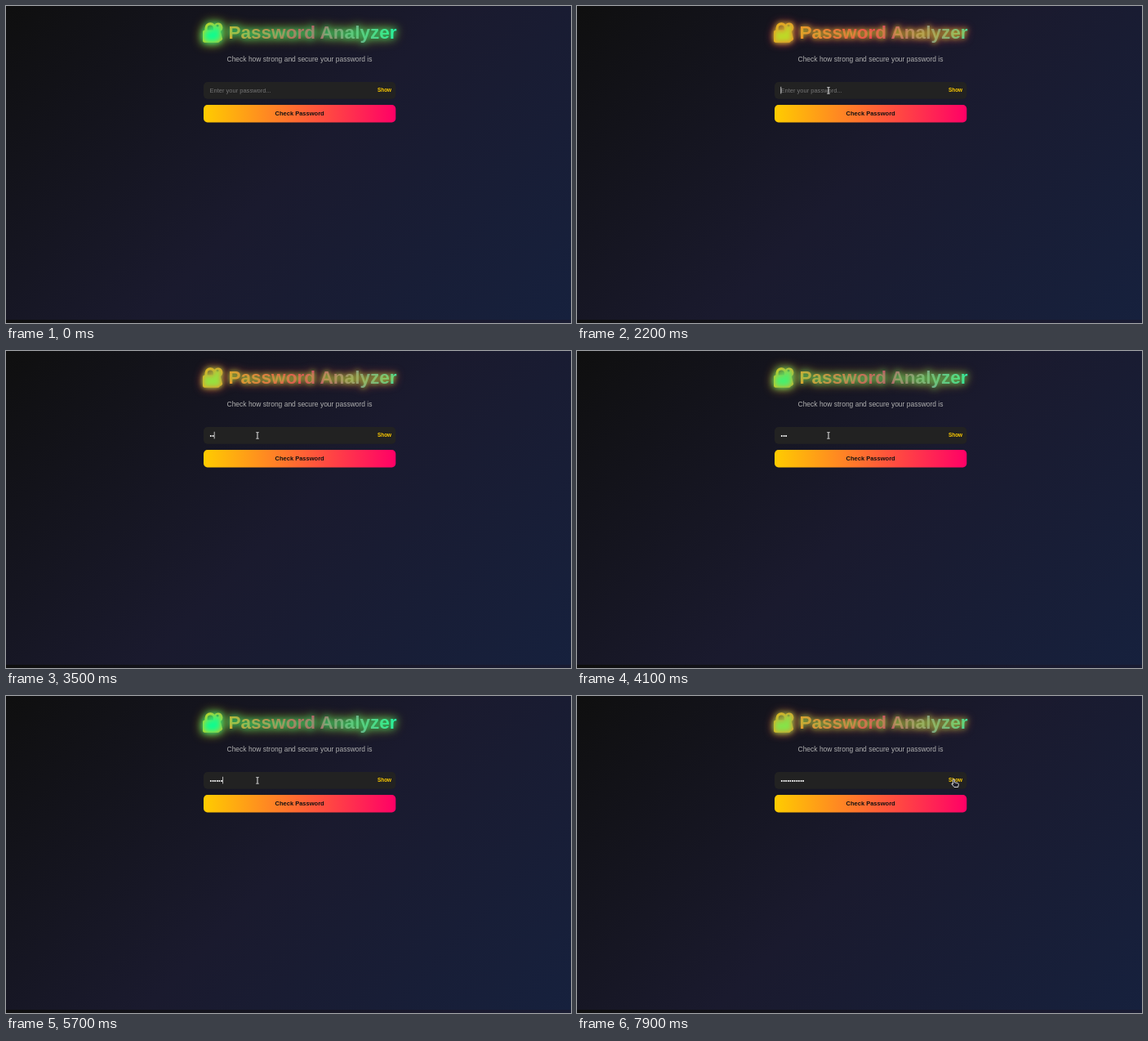
These frames come from a looping animation (692x388 px, 8000 ms). An HTML page:

```html
<!DOCTYPE html>
<html lang="en">
<head>
<meta charset="utf-8">
<title>Password Analyzer</title>
<style>
  html, body { margin: 0; width: 100%; height: 100%; overflow: hidden; }
  body {
    background: linear-gradient(135deg, #0f0f0f, #1a1a2e, #16213e) 0 0 / 719px 384px;
    font-family: "Liberation Sans", Arial, sans-serif;
  }
  svg { display: block; width: 692px; height: 388px; }
  text { white-space: pre; }
  .bold { font-weight: 700; }
  .field { font-size: 7.53px; }
  .inner { animation: inner 3s ease -3250ms infinite alternate paused; }
  .outer { animation: outer 3s ease -3250ms infinite alternate paused; }
  @keyframes inner {
    from { fill: #ffcc00; filter: blur(2.35px); }
    to { fill: #00ff99; filter: blur(4.7px); }
  }
  @keyframes outer {
    from { fill: #ff0066; filter: blur(4.7px); }
    to { fill: #ffcc00; filter: blur(7.05px); }
  }
  .pointer { fill: #20202a; stroke: #fff; stroke-width: .8; stroke-linejoin: round; }
</style>
</head>
<body>
<svg viewBox="0 0 692 388">
  <defs>
    <linearGradient id="rainbow" gradientUnits="userSpaceOnUse" x1="238" x2="480" y1="0" y2="0">
      <stop stop-color="#ffcc00"/>
      <stop offset=".5" stop-color="#ff0066"/>
      <stop offset="1" stop-color="#00ffcc"/>
    </linearGradient>
    <linearGradient id="warm">
      <stop stop-color="#ffcc00"/>
      <stop offset="1" stop-color="#ff0066"/>
    </linearGradient>
    <g id="heading">
      <!-- padlock: shackle, body, key -->
      <path d="M243.5 32v-5a6.8 6.8 0 0 1 13.6 0v5h-3.2v-5a3.6 3.6 0 0 0-7.2 0v5z"/>
      <rect x="241" y="29.5" width="21" height="15.2" rx="2.6"/>
      <path fill-rule="evenodd" d="M259.6 20.6a5.8 5.8 0 0 1 3.2 10.6l2.4 9.2-2.2 2.6-2.6-1.4-2.8-10a5.8 5.8 0 0 1 2-11zM259 22.8a1.5 1.5 0 1 0 .1 0z"/>
      <text class="bold" x="272.4" y="39.7" font-size="22.59">Password Analyzer</text>
    </g>
  </defs>

  <use href="#heading" fill="url(#rainbow)"/>
  <use href="#heading" class="outer"/>
  <use href="#heading" class="inner"/>

  <text x="359.5" y="67.6" font-size="8.47" text-anchor="middle" fill="#b0b0b0">Check how strong and secure your password is</text>

  <rect x="242" y="93" width="235.3" height="20.7" rx="4.7" fill="#222"/>
  <text id="hint" class="field" x="249.5" y="105.6" fill="#757575">Enter your password...</text>
  <text id="dots" class="field" x="249.5" y="105.8" fill="#fff"></text>
  <rect id="caret" y="98.8" width=".7" height="8.6" fill="#fff"/>
  <text class="bold" x="455" y="105.4" font-size="6.4" fill="#ffcc00">Show</text>

  <rect x="242" y="121" width="235.3" height="21.4" rx="4.7" fill="url(#warm)"/>
  <text class="bold" x="359.6" y="134.2" font-size="7.53" text-anchor="middle" fill="#111">Check Password</text>

  <g id="mouse">
    <path id="arrow" class="pointer" d="M0 0v9.4l2.2-2 1.5 3.3 1.5-.7-1.5-3.2h3z"/>
    <path id="hand" class="pointer" d="M-.9 .8a.9 .9 0 0 1 1.8 0v3l4 .9q1.2 .4 1 1.7l-.7 3.1h-4.7l-3-3.6q-.3-1 .8-.9l.8 .7z"/>
    <path id="beam" d="M-1.6-3.8h1.1l.5.4.5-.4h1.1M0-3.4v6.8M-1.6 3.8h1.1l.5-.4.5.4h1.1" fill="none" stroke="#fff" stroke-width=".9"/>
  </g>
</svg>
<script>
  const LOOP = 8000, BLINK = 500, DOT = 2.64;
  const $ = id => document.getElementById(id);
  const show = (id, on) => $(id).setAttribute("visibility", on ? "visible" : "hidden");

  const focusAt = 2000, blurAt = 7400;
  const keyTimes = [2850, 3250, 3550, 4500, 5000, 5400, 5900, 6150, 6400, 6650, 6900];

  // time, x, y, pointer shape
  const path = [
    [1050, 578, 255, "arrow"],
    [1200, 480, 198, "arrow"],
    [1300, 370, 138, "hand"],
    [1400, 324, 115, "hand"],
    [1500, 308, 103.4, "beam"],
    [6700, 308, 103.4, "beam"],
    [7000, 440, 97.2, "beam"],
    [7300, 455, 101, "hand"],
    [7500, 461.5, 102, "hand"]
  ];

  function drawField(t) {
    const typed = keyTimes.filter(k => k <= t);
    const since = t - (typed.length ? typed[typed.length - 1] : focusAt);
    $("dots").textContent = "•".repeat(typed.length);
    $("caret").setAttribute("x", 249.5 + typed.length * DOT);
    show("hint", !typed.length);
    show("caret", t >= focusAt && t < blurAt && since % (2 * BLINK) < BLINK);
  }

  function drawMouse(t) {
    const i = path.filter(p => p[0] <= t).length - 1;
    const a = path[Math.max(i, 0)], b = path[i + 1] || a;
    const k = i < 0 || a === b ? 0 : (t - a[0]) / (b[0] - a[0]);
    const x = a[1] + (b[1] - a[1]) * k, y = a[2] + (b[2] - a[2]) * k;
    $("mouse").setAttribute("transform", `translate(${x} ${y})`);
    for (const shape of ["arrow", "hand", "beam"]) show(shape, i >= 0 && a[3] === shape);
  }

  const glows = document.getAnimations();
  const start = performance.now();

  function draw() {
    const t = (performance.now() - start) % LOOP;
    for (const glow of glows) glow.currentTime = t;
    drawField(t);
    drawMouse(t);
    requestAnimationFrame(draw);
  }
  draw();
</script>
</body>
</html>
```
